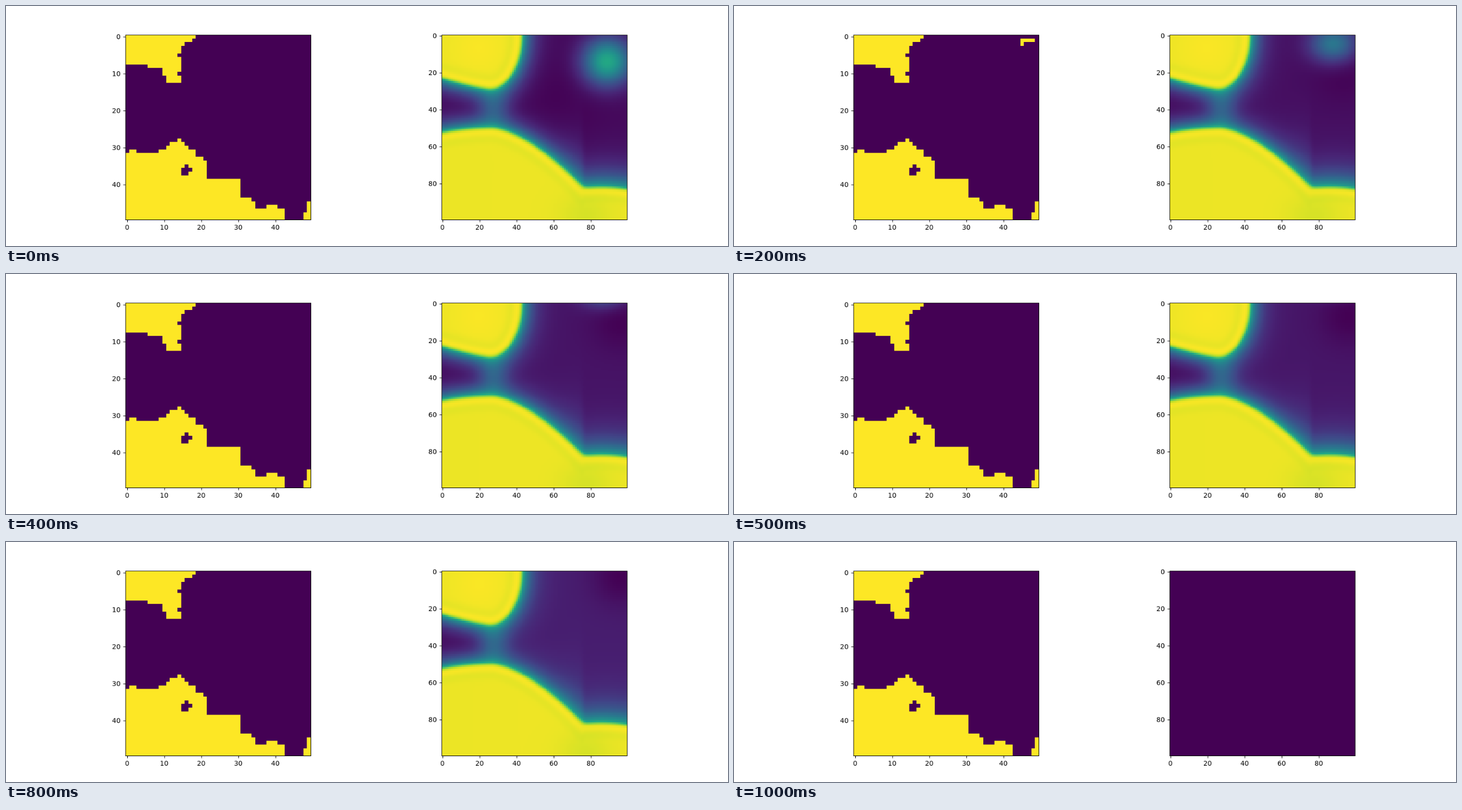
Animation, 1280 px wide and 427 px high, one loop 1.1 s. Source, as an HTML page with a canvas:

```html
<!DOCTYPE html>
<html lang="en">
<head>
<meta charset="utf-8">
<title>Mask and fitted field</title>
<style>
  html, body { margin: 0; width: 100%; height: 100%; overflow: hidden; background: #fff; }
  canvas { display: block; width: 1280px; height: 427px; }
</style>
</head>
<body>
<canvas id="stage" width="1500" height="500"></canvas>
<script>
const STEP = 100, STEPS = 11, SIZE = 385, TOP = 60;
const ctx = document.getElementById('stage').getContext('2d');
ctx.imageSmoothingEnabled = false;

const grid = n => {
  const c = document.createElement('canvas');
  c.width = c.height = n;
  return c.getContext('2d');
};
const mask = grid(50), field = grid(100);
const pixels = field.createImageData(100, 100);

// Viridis colour map
const stops = '440154 482475 414487 355f8d 2a788e 21918c 22a884 44bf70 7ad151 bddf26 fde725'
  .split(' ').map(h => [0, 2, 4].map(i => parseInt(h.slice(i, i + 2), 16)));
function viridis(v) {
  const p = Math.max(0, Math.min(1, v)) * 10, i = Math.min(9, Math.floor(p));
  return stops[i].map((c, k) => c + (stops[i + 1][k] - c) * (p - i));
}

// Left panel: outlines in cells, holes cut by the even-odd rule
const land = new Path2D(
  'M0 0H19V1H18V2H16V3H15V13H11V11H10V9H6V8H0Z M14 5h1v1h-1z M14 10h1v1h-1z' +
  'M0 32H1V31H3V32H9V31H11V30H12V29H14V28H15V29H16V30H17V31H19V33H21V34H22V39H31' +
  'V44H34V45H35V47H38V46H41V47H43V50H0Z M16 35h1v1h1v1h-1v1h-2v-2h1z M48 50V48H49V45H50V50Z');
const island = {
  1: new Path2D('M45 1h4v1h-1v1h1v2h-3v-3h-1z'),
  2: new Path2D('M45 1h4v1h-3v1h-1z')
};

function drawMask(step) {
  mask.fillStyle = '#440154';
  mask.fillRect(0, 0, 50, 50);
  mask.fillStyle = '#fde725';
  mask.fill(land, 'evenodd');
  if (island[step]) mask.fill(island[step]);
}

// Right panel: signed distances to two smooth outlines, positive outside
function upper(x, y) {
  const rx = 18.7, ry = 30.5 - .085 * Math.max(0, 26 - x) ** 1.3;
  const u = Math.max(0, x - 26) / rx, w = y / ry, r = Math.hypot(u, w);
  return r * (r - 1) / Math.hypot(u / rx, w / ry);
}
function shore(x) {
  const hill = 49 + (x < 27 ? .0036 * (27 - x) ** 2 : .062 * (x - 27) ** 1.6);
  const shelf = 81 + .006 * (x - 86) ** 2;
  return -Math.log(Math.exp(-hill) + Math.exp(-shelf));
}
const lower = (x, y) => (shore(x) - y) / Math.hypot(1, shore(x + .5) - shore(x - .5));

function profile(d, reach) {
  const level = .974;
  if (d > 0) return .5 * Math.exp(-d / reach);
  const edge = Math.exp(.25 * d - .3 * d * d);
  const ring = .018 * Math.exp(-((d + 4) ** 2) / 3) - .015 * Math.exp(-((d + 7.5) ** 2) / 6);
  return level + ring * (1 - edge) - (level - .5) * edge;
}
const bump = (x, y, cx, cy, sx, sy = sx) =>
  Math.exp(-((x - cx) ** 2) / (2 * sx * sx) - (y - cy) ** 2 / (2 * sy * sy));
const rise = (x, mid, width) => 1 / (1 + Math.exp((mid - x) / width));

const cells = Array.from({ length: 10000 }, (_, i) => {
  const x = i % 100 + .5, y = Math.floor(i / 100) + .5;
  const reach = 4.8 + 3 * rise(x, 68, 5);
  return {
    x, y,
    shape: Math.hypot(profile(upper(x, y), 4.8), profile(lower(x, y), reach)),
    neck: .23 * bump(x, y, 28, 39, 6, 8),
    tint: .02 * bump(x, y, 20, 7, 11) - .035 * bump(x, y, 78, 98, 10, 8)
  };
});

// A spot leaves through the top edge, a dark hollow follows, the floor brightens
function height(c, step) {
  const base = .022 + .0072 * step;
  const hollow = bump(c.x, c.y, 97 - 37 * Math.exp(-1.2 * step),
    36 * Math.exp(-.33 * step), 11 + 9 * Math.exp(-step));
  const spot = .58 * Math.exp(-.22 * step) *
    bump(c.x, c.y, 89.3 - .5 * step, 14.5 - 4.8 * step, 9.3 - .2 * step, 9 - .9 * step);
  const floor = base * rise(c.x, 30, 6) * (1 - hollow);
  const inside = Math.max(0, Math.min(1, (c.shape - .5) * 2.5));
  return c.shape + (1 - c.shape) * (floor + c.neck + spot) + c.tint * inside;
}

function drawField(step) {
  const blank = step === STEPS - 1;
  cells.forEach((c, i) =>
    pixels.data.set([...viridis(blank ? 0 : height(c, step)), 255], i * 4));
  field.putImageData(pixels, 0, 0);
}

function drawPanel(image, left, n, every) {
  const x0 = Math.round(left), pitch = SIZE / n;
  ctx.drawImage(image.canvas, x0, TOP, SIZE, SIZE);
  ctx.strokeStyle = ctx.fillStyle = '#000';
  ctx.lineWidth = 1.11;
  ctx.font = '13.89px "DejaVu Sans", sans-serif';
  ctx.beginPath();
  ctx.rect(x0 + .5, TOP + .5, SIZE, SIZE);
  for (let v = 0; v < n; v += every) {
    const x = left + (v + .5) * pitch, y = TOP + (v + .5) * pitch;
    const tx = Math.round(x) + .5, ty = Math.round(y) + .5;
    ctx.moveTo(tx, TOP + SIZE + .5);
    ctx.lineTo(tx, TOP + SIZE + 5.4);
    ctx.moveTo(x0 + .5, ty);
    ctx.lineTo(x0 - 4.4, ty);
    ctx.textAlign = 'center';
    ctx.fillText(v, x, 466);
    ctx.textAlign = 'right';
    ctx.fillText(v, left - 9.7, y + 5.3);
  }
  ctx.stroke();
}

let shown = -1;
function tick() {
  const step = Math.floor(performance.now() / STEP) % STEPS;
  if (step !== shown) {
    shown = step;
    drawMask(step);
    drawField(step);
    ctx.fillStyle = '#fff';
    ctx.fillRect(0, 0, 1500, 500);
    drawPanel(mask, 247.7, 50, 10);
    drawPanel(field, 904.8, 100, 20);
  }
  requestAnimationFrame(tick);
}
tick();
</script>
</body>
</html>
```
